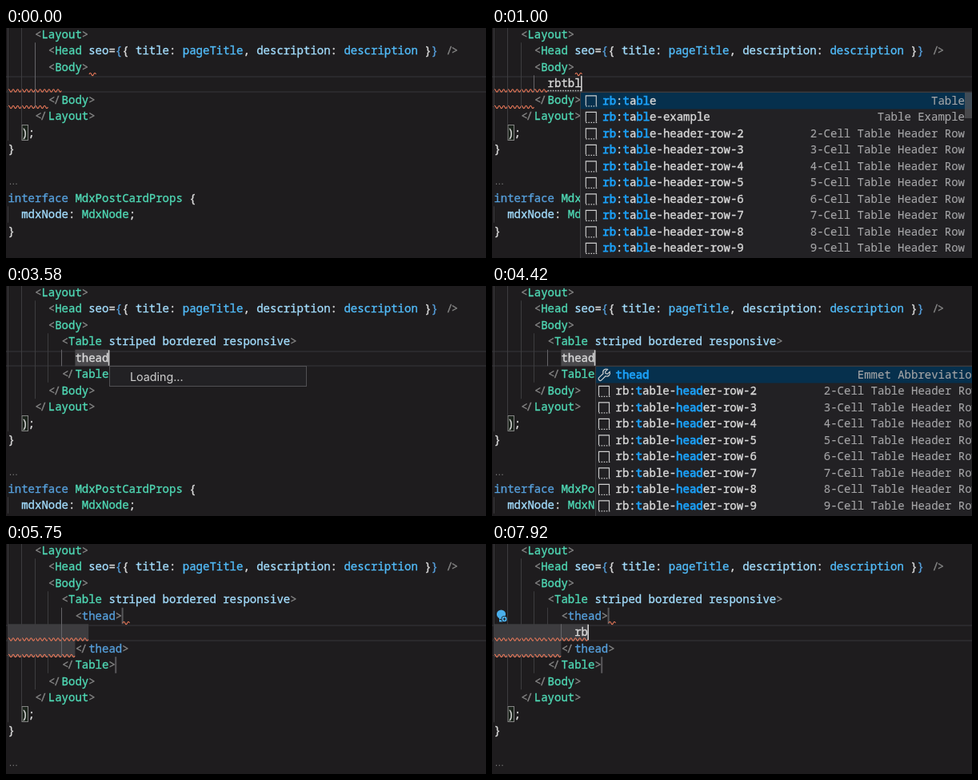
An HTML page for the animation above (8 s loop, 600 by 288 pixels).

```html
<!DOCTYPE html>
<html lang="en">
<head>
<meta charset="utf-8">
<title>Snippet typing</title>
<style>
html, body { margin: 0; width: 100%; height: 100%; overflow: hidden; background: #1e1c1e; }
svg { display: block; width: 600px; height: 288px; }
text { font: 14px "Noto Sans Mono", monospace; white-space: pre; stroke-width: .35px; }
.ui { font: 14.3px Inter, sans-serif; stroke-width: 0; }
.info { stroke-width: .12px; }
.hit { stroke-width: .75px; }
.lens { font-size: 10px; letter-spacing: -2.2px; stroke-width: 0; }
</style>
</head>
<body>
<svg id="stage" viewBox="0 0 600 288"></svg>
<script>
const LOOP = 8000, CW = 8.4, LH = 20.5;
const stage = document.getElementById('stage');
const C = {
  plain: '#dadada', gray: '#858585', tag: '#4fd8b4', key: '#569fdb',
  attr: '#a2dcfc', konst: '#52bdfb', hit: '#1ba0f8', wave: '#e9795a'
};
const colX = c => 2.4 + c * CW;
const rowY = r => r * LH - 2.25;
const esc = s => s.replace(/&/g, '&amp;').replace(/</g, '&lt;');

const text = (x, y, s, fill, cls = '') =>
  `<text x="${x.toFixed(1)}" y="${y.toFixed(1)}" fill="${fill}" stroke="${fill}" class="${cls}">${esc(s)}</text>`;
const rect = (x, y, w, h, fill, extra = '') =>
  `<rect x="${x}" y="${y}" width="${w}" height="${h}" fill="${fill}" ${extra}/>`;
const line = (d, stroke, w = 1, extra = '') =>
  `<path d="${d}" fill="none" stroke="${stroke}" stroke-width="${w}" ${extra}/>`;

// Token rules, first match wins
const RULES = [
  [/^(<\/|\/>|[<>])/, C.gray],
  [/^(\{(?=\{)|\}(?= \/))/, C.key],
  [/^(interface|function|thead)\b/, C.key],
  [/^pageTitle/, C.konst],
  [/^[A-Z]\w*/, C.tag],
  [/^\w+/, C.attr],
  [/^./, C.plain]
];

function codeLine(src, row) {
  const y = rowY(row) + 14.8;
  if (src === '…') return text(2.5, y - 1, '...', C.gray, 'lens');
  const plain = src[0] === '!';
  if (plain) src = src.slice(1);
  let out = '', i = 0;
  while (i < src.length) {
    const rest = src.slice(i);
    const space = rest.match(/^\s+/);
    if (space) { i += space[0].length; continue; }
    let [s, fill] = plain ? [rest, C.plain] : ['', ''];
    for (const [re, c] of plain ? [] : RULES) {
      const m = rest.match(re);
      if (m) { s = m[0]; fill = c; break; }
    }
    if (s === 'description' && src.slice(i - 2, i) === ': ') fill = C.konst;
    const x = colX(i);
    // tight pairs, as in a ligature font
    if (s === '</') out += text(x + 0.3, y, '<', fill) + text(x + CW - 1.8, y, '/', fill);
    else if (s === '/>') out += text(x + 1.8, y, '/', fill) + text(x + CW, y, '>', fill);
    else out += text(x, y, s, fill);
    i += s.length;
  }
  return out;
}

function wave(x1, x2, row) {
  const y = rowY(row) + LH - 1.3;
  const n = Math.round((x2 - x1) / 2.8);
  return line(`M${x1} ${y}q1.4 -3.4 2.8 0${' t2.8 0'.repeat(n - 1)}`, C.wave, 1.1);
}

const bar = (col, row) => rect(colX(col) - 0.6, rowY(row), 2, LH, '#59585b');
const shade = (c1, c2, row, fill = '#3d3c3f') =>
  rect(colX(c1), rowY(row), (c2 - c1) * CW, LH, fill);

function guides(n, active, extra) {
  const spans = [[0, 0, n], [2, 0, n - 1], [4, 1, n - 2], [0, n + 5, n + 5], ...extra];
  if (n > 6) spans.push([6, 3, n - 3], [8, 4, n - 4]);
  return spans.map(([c, a, b]) =>
    rect(Math.floor(colX(c)), rowY(a), 1, (b - a + 1) * LH, c === active ? '#656468' : '#3d3c3f')).join('');
}

const snippetIcon = (x, y) =>
  line(`M${x} ${y + 6}v-12h13v12`, '#cfcfcf', 1.1) +
  line(`M${x} ${y + 7}h14`, '#cfcfcf', 1.3, 'stroke-dasharray="1.5 1.6"');

const wrench = (x, y) =>
  line(`M${x} ${y + 4}l5.5 -5.2c-1.2 -4 2 -6.6 5.5 -5.3l-3 3 .5 2.2 2.4 .6 2.8 -2.8c1.2 4 -1.8 6.6 -5.2 5.4l-5.4 5.3c-2 1.4 -4.5 -1.2 -3.1 -3.2z`, '#d0d0d0', 1.2);

// Characters covered by a mask get the match colour
function label(x, y, s, mask) {
  let out = '';
  for (const m of mask.matchAll(/x+|\.+/g)) {
    const hit = m[0][0] === 'x';
    out += text(x + m.index * CW, y, s.slice(m.index, m.index + m[0].length),
      hit ? C.hit : C.plain, hit ? 'hit' : '');
  }
  return out;
}

function popup(x, row, right, items, textX) {
  const top = Math.round(rowY(row));
  let out = rect(x + 0.5, top + 0.5, 600, 300, '#222124', 'stroke="#3c3b3e"') +
    rect(x + 1, top + 1, 600, LH, '#06304d');
  items.forEach(([name, info, mask], i) => {
    const y = top + 10.9 + i * LH;
    out += name === 'thead' ? wrench(textX - 21, y) : snippetIcon(textX - 21, y);
    out += label(textX, y + 4.8, name, mask.padEnd(name.length, '.'));
    out += text(right - info.length * CW, y + 4.8, info, '#a5a5a7', 'info');
  });
  return out;
}

function loading(x, row) {
  const y = Math.round(rowY(row)) + 0.5;
  return rect(x + 0.5, y, 246, 25, '#222124', 'stroke="#515053"') +
    text(x + 26, y + 18, 'Loading...', '#cfcfcf', 'ui');
}

const headerRows = mask => Array.from({ length: 8 }, (_, i) =>
  [`rb:table-header-row-${i + 2}`, `${i + 2}-Cell Table Header Row`, mask]);
const TABLE_ITEMS = [
  ['rb:table', 'Table', 'xx.x.xx.'],
  ['rb:table-example', 'Table Example', 'xx.x.xx.'],
  ...headerRows('xx.x.xx.')
];
const THEAD_ITEMS = [['thead', 'Emmet Abbreviation', 'xxxxx'], ...headerRows('...x.....xxxx')];

const bulb = () =>
  '<circle cx="11.5" cy="88" r="5.6" fill="#4aaeea"/>' +
  rect(9, 92, 5, 5.5, '#4aaeea') + rect(9.5, 94, 4, 1, '#1e1c1e') +
  '<circle cx="15.5" cy="94" r="4" fill="#1e1c1e"/><circle cx="15.5" cy="94" r="3.2" fill="#4aaeea"/>' +
  line('M13.8 94h3.4M15.5 92.3v3.4', '#1e1c1e', 1);

const KEYS1 = [170, 250, 420, 500, 580];
const KEYS2 = [2750, 2830, 3000, 3080, 3250];
const KEYS3 = [7670, 7830];
const T = { load1: 670, list1: 830, table: 1500, load2: 3420, list2: 3750, pair: 4670, enter: 5170, bulb: 6250 };
const PRESSES = [-600, ...KEYS1, T.table, ...KEYS2, T.pair, T.enter, ...KEYS3];
const typed = (t, word, keys) => word.slice(0, keys.filter(k => t >= k).length);

const HEAD = [
  '    <Layout>',
  '      <Head seo={{ title: pageTitle, description: description }} />',
  '      <Body>'
];
const TAIL = [
  '      </Body>', '    </Layout>', '  );', '}', '', '…',
  'interface MdxPostCardProps {', '  mdxNode: MdxNode;', '}', '',
  'function MdxPostCard({ mdxNode }: MdxPostCardProps) {'
];
const OPEN = '        <Table striped bordered responsive>', CLOSE = '        </Table>';

function draw(t) {
  let body, row, col, under = '', over = '', selecting = false, active = 8, extra = [];
  if (t < T.table) {
    const word = typed(t, 'rbtbl', KEYS1);
    body = ['!' + ' '.repeat(8) + word];
    row = 3;
    col = 8 + word.length;
    active = word ? 6 : 4;
    under = wave(2, 70, 3) + wave(2, 52, 4) + wave(104, 112, 2);
    if (word) {
      extra = [[6, 3, 3]];
      under += line(`M${colX(8)} 78.5H${colX(col)}`, '#c4c4c4', 1.4, 'stroke-dasharray="1.6 1.5"');
    }
    if (t >= T.list1) over = popup(110, 4, 591, TABLE_ITEMS, 138.3) + rect(591, 81, 9, 32, '#59595c', 'opacity=".7"');
    else if (t >= T.load1) over = loading(112, 4);
  } else if (t < T.pair) {
    selecting = t < KEYS2[0];
    const word = selecting ? 'thead, tbody, etc' : typed(t, 'thead', KEYS2);
    body = [OPEN, '!' + ' '.repeat(10) + word, CLOSE];
    row = 4;
    col = 10 + word.length;
    under = shade(10, col, 4, selecting ? '#3b5879' : '#4a494c') + bar(16, 5);
    if (selecting)
      for (const c of [16, 23])
        under += `<circle cx="${colX(c + 0.5)}" cy="${rowY(4) + 10.5}" r=".9" fill="#8796a8"/>`;
    if (t >= T.list2) over = popup(129, 5, 608, THEAD_ITEMS, 154.5);
    else if (t >= T.load2) over = loading(129, 5);
  } else if (t < T.enter) {
    body = [OPEN, ' '.repeat(10) + '<thead></thead>', CLOSE];
    row = 4;
    col = 17;
    under = bar(25, 4) + bar(16, 5);
  } else {
    const word = typed(t, 'rb', KEYS3);
    body = [OPEN, ' '.repeat(10) + '<thead>', '!' + ' '.repeat(12) + word, ' '.repeat(10) + '</thead>', CLOSE];
    row = 5;
    col = 12 + word.length;
    if (word) {
      active = 10;
      extra = [[10, 5, 5]];
    }
    under = shade(0, col, 5) + shade(0, 10, 6) + bar(17, 4) + bar(16, 7) +
      wave(2, colX(col), 5) + wave(2, 86, 6) + wave(146, 154, 4);
    if (t >= T.bulb) over = bulb();
  }

  const lines = [...HEAD, ...body, ...TAIL];
  const close = HEAD.length + body.length + 2;
  let out = rect(0, 0, 600, 288, '#1e1c1e');
  if (!selecting)
    out += line(`M0 ${Math.round(rowY(row)) + 2}H600M0 ${Math.round(rowY(row + 1))}H600`, '#2a292c', 2);
  out += under + guides(close, active, extra);
  if (!selecting)
    out += rect(20, Math.round(rowY(close)) + 0.5, 7.5, 19, '#1b231b', 'stroke="#858585"');
  out += lines.map(codeLine).join('');

  const last = PRESSES.filter(k => k <= t).pop();
  if ((t - last) % 1000 < 500)
    out += rect(colX(col) - 0.6, rowY(row) + 0.5, 1.6, LH - 1, '#cfcfcf');
  return out + over;
}

let shown = '';
function tick(now) {
  const next = draw(now % LOOP);
  if (next !== shown) stage.innerHTML = shown = next;
  requestAnimationFrame(tick);
}
stage.innerHTML = shown = draw(0);
requestAnimationFrame(tick);
</script>
</body>
</html>
```
